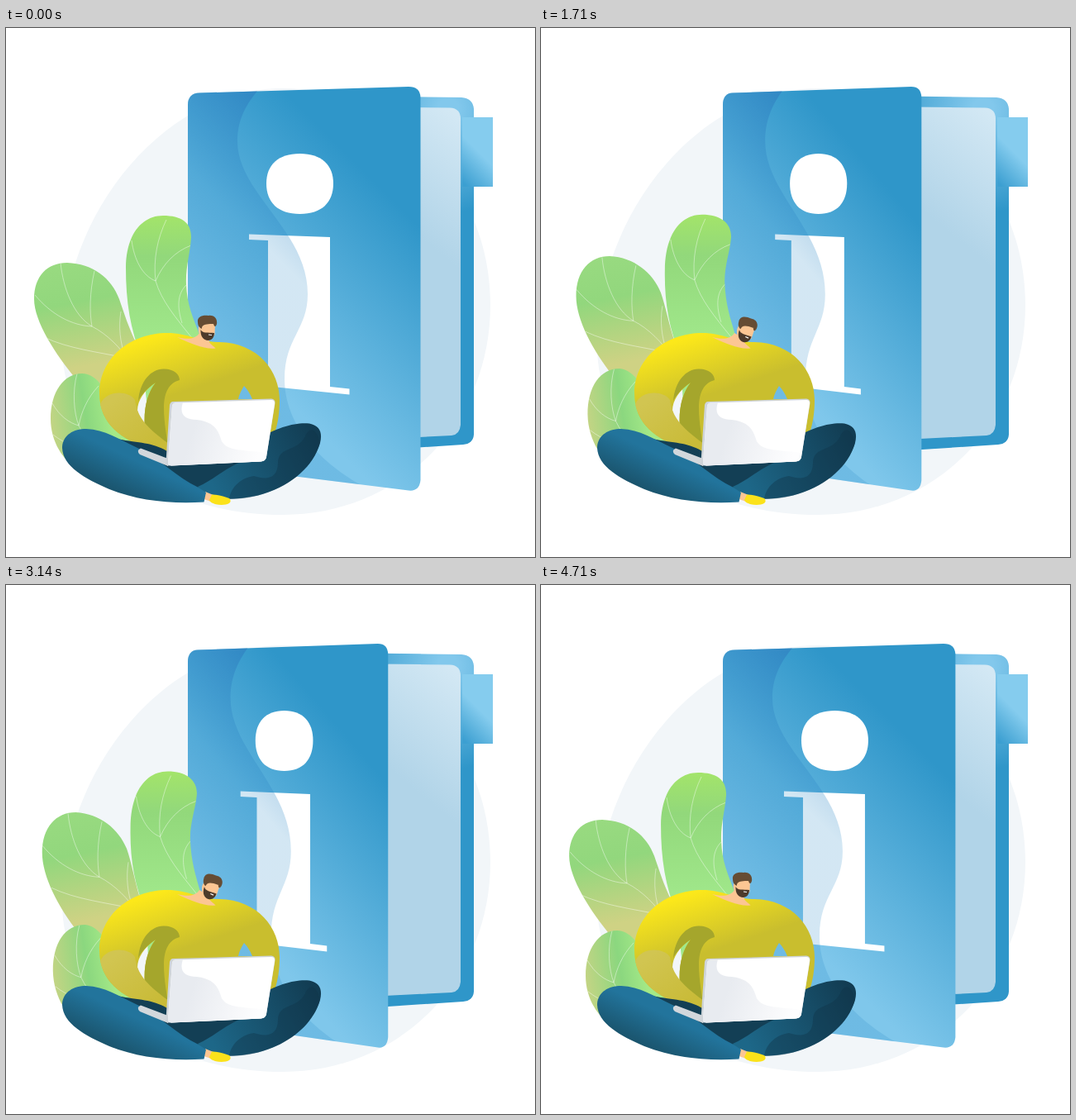
Animation of 640x640 px, one loop 4.78 s. Source, as an HTML page:

```html
<!DOCTYPE html>
<html lang="en">
<head>
<meta charset="utf-8">
<title>Information folder</title>
<style>
html, body { margin: 0; width: 100%; height: 100%; overflow: hidden; background: #fff; }
svg { display: block; width: 100%; height: 100%; }
.veins { fill: none; stroke: #fff; stroke-width: 1; stroke-opacity: .42; }
</style>
</head>
<body>
<svg viewBox="0 0 640 640" xmlns="http://www.w3.org/2000/svg">
<defs>
  <radialGradient id="backFill" gradientUnits="userSpaceOnUse" cx="535" cy="98" r="125">
    <stop offset=".1" stop-color="#82c8ec"/><stop offset="1" stop-color="#2f96c9"/>
  </radialGradient>
  <linearGradient id="pageFill" gradientUnits="userSpaceOnUse" x1="545" y1="105" x2="455" y2="215">
    <stop offset="0" stop-color="#d3e8f4"/><stop offset="1" stop-color="#b1d4e8"/>
  </linearGradient>
  <linearGradient id="tabFill" gradientUnits="userSpaceOnUse" x1="546" y1="180" x2="574" y2="152">
    <stop offset="0" stop-color="#3c9fd1"/><stop offset="1" stop-color="#85ccee"/>
  </linearGradient>
  <linearGradient id="coverFill" gradientUnits="userSpaceOnUse" x1="460" y1="200" x2="275" y2="385">
    <stop offset="0" stop-color="#2f96c9"/><stop offset="1" stop-color="#7fc7eb"/>
  </linearGradient>
  <linearGradient id="tintFill" gradientUnits="userSpaceOnUse" x1="300" y1="70" x2="210" y2="160">
    <stop offset="0" stop-color="#2e78bd" stop-opacity=".55"/>
    <stop offset="1" stop-color="#2e8cc8" stop-opacity=".21"/>
  </linearGradient>
  <linearGradient id="leafFill0" x1="0" y1="0" x2="0" y2="1">
    <stop offset="0" stop-color="#a3e46a"/><stop offset=".2" stop-color="#92d87b"/><stop offset=".6" stop-color="#a0e78a"/>
  </linearGradient>
  <linearGradient id="leafFill1" x1=".4" y1="0" x2=".55" y2="1">
    <stop offset="0" stop-color="#98da80"/><stop offset=".3" stop-color="#92d77d"/><stop offset=".8" stop-color="#cfd284"/>
  </linearGradient>
  <linearGradient id="leafFill2" x1="0" y1=".5" x2=".8" y2=".35">
    <stop offset="0" stop-color="#c3d484"/><stop offset=".5" stop-color="#8bd77f"/><stop offset=".85" stop-color="#a4e987"/>
  </linearGradient>
  <linearGradient id="shirtFill" gradientUnits="userSpaceOnUse" x1="185" y1="372" x2="208" y2="442">
    <stop offset="0" stop-color="#fce81a"/><stop offset="1" stop-color="#c9be2e"/>
  </linearGradient>
  <linearGradient id="armFill" gradientUnits="userSpaceOnUse" x1="135" y1="446" x2="180" y2="505">
    <stop offset="0" stop-color="#d1c551"/><stop offset="1" stop-color="#c9bb38"/>
  </linearGradient>
  <linearGradient id="legFill" gradientUnits="userSpaceOnUse" x1="165" y1="500" x2="135" y2="563">
    <stop offset="0" stop-color="#22749c"/><stop offset=".35" stop-color="#22749c"/><stop offset="1" stop-color="#1a546d"/>
  </linearGradient>
  <linearGradient id="farLegFill" gradientUnits="userSpaceOnUse" x1="250" y1="555" x2="375" y2="490">
    <stop offset="0" stop-color="#1d6788"/><stop offset="1" stop-color="#123c52"/>
  </linearGradient>
  <linearGradient id="lidFill" gradientUnits="userSpaceOnUse" x1="225" y1="490" x2="305" y2="515">
    <stop offset="0" stop-color="#e8ebf0"/><stop offset="1" stop-color="#fdfdfe"/>
  </linearGradient>
</defs>

<path fill="#f2f6f9" d="M335 73C480 73 586 195 586 335C586 480 475 589 335 589C190 589 68 505 68 385C66 235 185 73 335 73Z"/>

<path fill="url(#backFill)" d="M400 82L551 84Q565 85 566 98V492Q565 503 553 504L400 514Z"/>
<path fill="url(#pageFill)" d="M400 95L537 96.5Q550 97 550 110V480Q549 492 539 493L400 500Z"/>
<path fill="url(#tabFill)" d="M552 108H589V192H552Z"/>

<g id="cover">
  <path fill="url(#coverFill)" d="M220 93Q220 79 234 78.500L487 71Q501 71 501.500 84V547Q500 561 487 559.500L234 528Q220 526 220 512Z"/>
  <path fill="#fff" d="M355.500 152C382 152 396 166 396 188C396 211 382 225 355.500 225C329 225 315 211 315 188C315 166 329 152 355.500 152Z"/>
  <path fill="#fff" d="M294 249.500L392 253V434L415.500 436.500V443.500L317 433.500V257L294 256Z"/>
  <path fill="url(#tintFill)" d="M304 76.500C284 100 280 120 280 137C280 200 365 245 365 322C365 365 337 375 337 425C337 480 380 525 428 552.200L234 528Q220 526 220 512V93Q220 79 234 78.500Z"/>
</g>

<g id="leaves"></g>

<path fill="url(#shirtFill)" fill-rule="evenodd" d="M113 442C113 400 150 369 195 369C222 369 232 380 258 380C305 381 331 415 331 450C331 465 329 478 325 490L290 520L196 516C150 504 113 486 113 442Z
  M181 429C168 438 159 450 159 463C161 471 164 476 168 485C166 460 171 442 181 429Z
  M288 433C285 438 282 443 281 449L298 449C295 442 292 437 288 433Z"/>
<path fill="#a5a62c" d="M160 452C162 426 176 413 190 412.500C203 412 210 419 210 426C198 429 191 440 191 460C191 480 196 500 197 518L168 486C166 460 171 442 181 429C170 436 162 446 160 452Z"/>
<path fill="url(#armFill)" d="M114 455C121 438 148 438 156 450C159 470 168 482 197 503L193 515C150 504 121 487 114 455Z"/>

<path fill="#fcc693" d="M207 374C218 377 229 377 234 369L246 376C244 382 250 383 253.500 387.500C240 389 224 382 207 374Z"/>
<g id="head">
  <path fill="#fcc693" d="M235 358C240 354 250 355 253 357L252.500 371L247 377L235 372C232 367 232 362 235 358Z"/>
  <path fill="#4c3a2b" d="M235.500 365C238 370 244 368 252 369C252 374 249 378 244.500 378C239 378 235 373 235.500 365Z"/>
  <path fill="#664c33" d="M232 356C231 349 238 347 245 348C252 347 256 352 255 358C254 362 252 362 251 358C245 358 240 358 237.500 361L236.500 364C233 362 232 359 232 356Z"/>
  <path stroke="#fff" stroke-width="1.200" fill="none" d="M245 371L249 371.500"/>
</g>

<path fill="#133f55" d="M130 496C160 503 175 500 195 512L300 520C275 530 255 548 234 560Z"/>
<path fill="url(#farLegFill)" d="M300 500C330 482 350 477 367 478.500C380 481 383 490 380 502C372 530 345 555 305 565.500C285 570 262 571 240 568L232 555C252 547 265 531 290 523Z"/>
<path fill="#0f3448" opacity=".4" d="M270 570C272 555 285 544 300 542C318 548 329 543 329 526C330 505 352 514 362 494C366 485 374 480 380 502C372 530 345 555 305 565.500C292 569 280 570 270 570Z"/>

<g id="leg">
  <path fill="#fcc693" d="M241 561L239.500 570L248 573L251 565Z"/>
  <path fill="url(#legFill)" d="M68 507C69 492 82 485 97 485C120 486 136 497 157 507C185 520 207 544 232 555.500L242 562L239.500 573.500C200 576 160 572 125 558C95 545 68 530 68 507Z"/>
</g>
<path id="shoe" fill="#fbe21b" d="M249 564.500C256 564 264 567 270 569C273 572 272 575 266 576.500C256 578 247 575 246 571Z"/>

<path fill="#d2d7dc" d="M163 508.500L196 521V530L162 516Q157 511 163 508.500Z"/>
<path fill="#cfd4d9" d="M202 452L321 448.500Q326 449 325.500 454L315 519Q314 524 308 524.500L198 529.500Q192.500 530 193.500 525L198 456Q199 452 202 452Z"/>
<path fill="#fff" d="M205 453.500L321 450Q325.500 450 325 455L315 519Q314 524 308 524.500L200 529.500Q195.500 529 196 525L201 457Q202 453.500 205 453.500Z"/>
<path fill="url(#lidFill)" d="M205 453.500L214 453.300C209 468 217 474 231 474C254 477 257 488 261 500C268 513 292 510 314 514L315 519Q314 524 308 524.500L200 529.500Q195.500 529 196 525L201 457Q202 453.500 205 453.500Z"/>
</svg>
<script>
const LOOP = 4780;
const TAU = Math.PI * 2;
const byId = id => document.getElementById(id);

// Each leaf sways between two outlines; its veins drift along.
const leaves = [
  {
    rest: 'M165 400C150 365 145 330 145 290C145 252 163 227 190 227C212 227 224 235 224 253C223 272 217 290 218 310C219 335 226 350 235 373L215 420L172 472Z',
    sway: 'M172 396C157 362 152 330 153 295C153 250 172 225 198 225C220 225 234 236 234 252C233 268 225 285 225 306C226 335 231 352 236 373L216 420L173 472Z',
    veins: 'M194 232C183 255 178 280 181 306M152 257C155 280 165 300 181 306M224 263C205 270 190 285 181 306C188 330 205 350 225 375M218 311C207 322 207 338 213 357',
    drift: [8, -2]
  },
  {
    rest: 'M85 425C60 395 34 355 34 328C34 300 50 284 74 284C105 285 128 303 137 328C143 345 148 362 158 382L150 440Z',
    sway: 'M88 418C65 388 48 352 48 322C48 290 65 271 89 271C118 273 140 292 150 315C156 332 158 352 164 378L155 435Z',
    veins: 'M66 284C69 315 82 348 104 361M107 294C101 320 101 345 104 361M35 323C55 347 80 360 104 361C122 370 140 388 150 405M139 343C136 362 138 380 144 397M46 374C75 388 112 392 144 399',
    drift: [13, -11]
  },
  {
    rest: 'M98 540C75 532 54 505 54 473C54 440 70 418 92 418C110 418 125 440 130 470L160 500L125 540Z',
    sway: 'M104 535C80 530 59 500 58 464C58 430 72 408 97 408C115 410 130 435 135 465L162 498L130 536Z',
    veins: 'M86 418C80 440 82 465 88 481M56 454C65 470 77 478 88 481M112 433C98 448 91 465 88 481C97 500 112 515 135 525M57 492C72 504 90 510 112 513',
    drift: [4, -9]
  }
];

byId('leaves').innerHTML = leaves.map((leaf, i) =>
  `<clipPath id="clip${i}"><path/></clipPath>
   <path id="leaf${i}" fill="url(#leafFill${i})"/>
   <g clip-path="url(#clip${i})"><path id="veins${i}" class="veins" d="${leaf.veins}"/></g>`
).join('');

leaves.forEach((leaf, i) => {
  leaf.shape = byId('leaf' + i);
  leaf.clip = byId('clip' + i).firstChild;
  leaf.lines = byId('veins' + i);
  leaf.goal = leaf.sway.match(/\d+/g);
});

const [cover, head, leg, shoe] = ['cover', 'head', 'leg', 'shoe'].map(byId);

function blend(leaf, k) {
  let n = 0;
  return leaf.rest.replace(/\d+/g, v => (+v + (leaf.goal[n++] - v) * k).toFixed(2));
}

function ease(t, from, to) {
  const p = Math.min(1, Math.max(0, (t - from) / (to - from)));
  return (1 - Math.cos(p * Math.PI)) / 2;
}

function spin(el, deg, x, y) {
  el.setAttribute('transform', `rotate(${deg.toFixed(3)} ${x} ${y})`);
}

function draw(t) {
  const phase = TAU * t / LOOP;

  const width = 256.2 + 25.3 * Math.cos(phase);
  cover.setAttribute('transform', `translate(220 0) scale(${(width / 281.5).toFixed(5)} 1) translate(-220 0)`);

  const k = (1 - Math.cos(2 * phase)) / 2;
  for (const leaf of leaves) {
    const d = blend(leaf, k);
    leaf.shape.setAttribute('d', d);
    leaf.clip.setAttribute('d', d);
    leaf.lines.setAttribute('transform', `translate(${leaf.drift.map(v => (v * k).toFixed(2))})`);
  }

  const lift = ease(t, 0, 570) - ease(t, 570, 1140);
  spin(leg, 6.7 * lift, 241, 569);
  spin(shoe, 5 * lift, 258, 573);

  const nod = ease(t, 600, 1140) - ease(t, 4000, 4570);
  spin(head, 17 * nod, 238, 380);
}

function tick() {
  draw(performance.now() % LOOP);
  requestAnimationFrame(tick);
}
tick();
</script>
</body>
</html>
```
